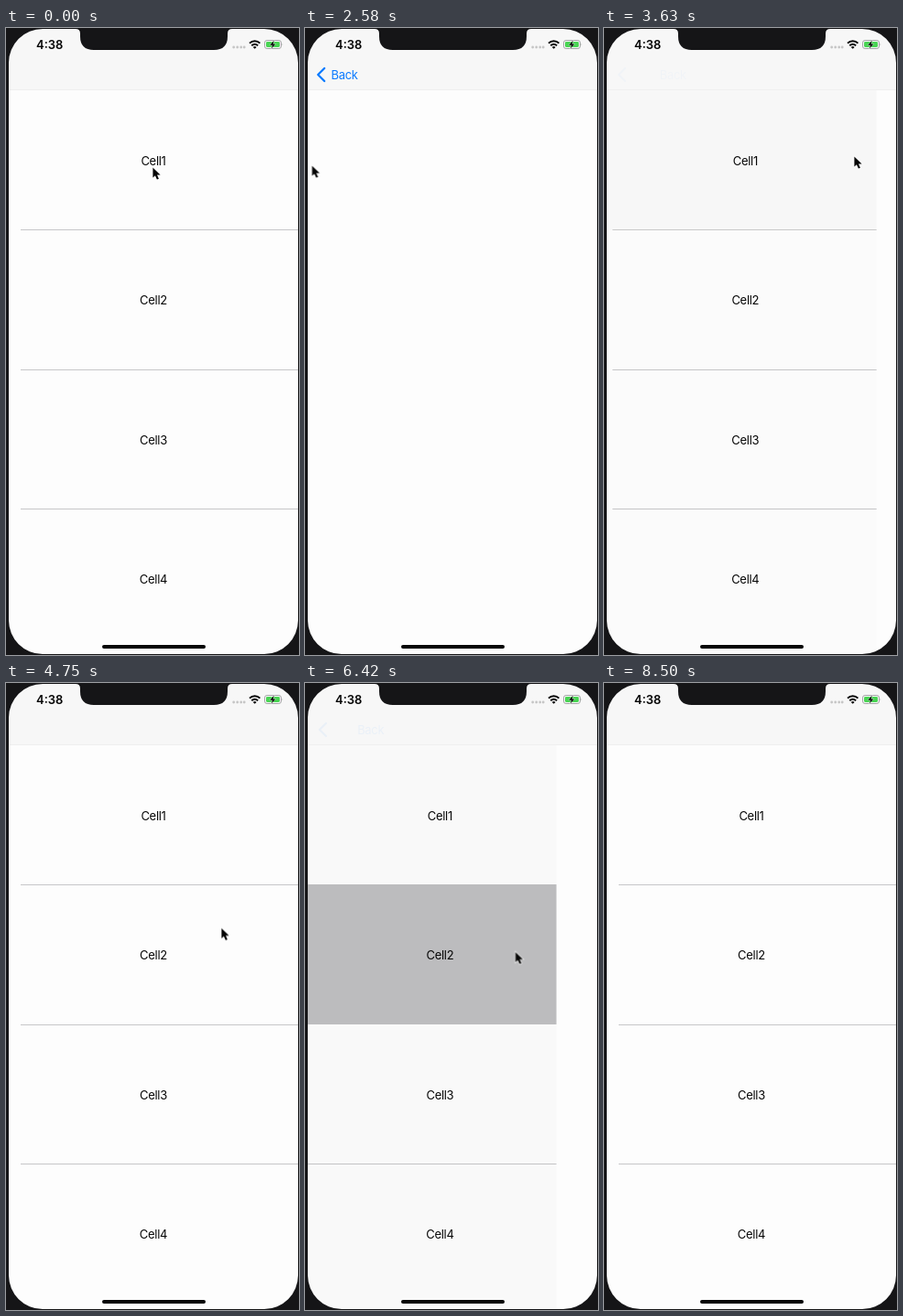
Recreate the animation shown at these times as an HTML page. Size 320 by 685 pixels, loop 8540 ms.

```html
<!DOCTYPE html>
<html lang="en">
<head>
<meta charset="utf-8">
<title>List navigation</title>
<style>
/* --p: 0 = detail pushed, 1 = list at rest; --s1, --s2: row selection */
@property --p { syntax: '<number>'; inherits: true; initial-value: 1; }
@property --s1 { syntax: '<number>'; inherits: true; initial-value: 0; }
@property --s2 { syntax: '<number>'; inherits: true; initial-value: 0; }

:root { --loop: 8540ms; --paper: #fdfdfd; --case: #151517; }
html, body { margin: 0; width: 100%; height: 100%; overflow: hidden; background: var(--case); }
.stage {
  position: relative; width: 320px; height: 685px; overflow: hidden;
  font: 13px/20px Inter, "Liberation Sans", sans-serif; letter-spacing: -.3px; color: #060606;
  animation: nav var(--loop) infinite linear, pick1 var(--loop) infinite linear, pick2 var(--loop) infinite linear;
}
.stage > *, .list > * { position: absolute; }

.list {
  left: 3px; top: 68px; width: 317px; height: 617px; background: var(--paper);
  transform: translateX(calc((var(--p) - 1) * 95px));
}
.line { left: 13px; right: 0; height: 1px; background: #c6c6c8; opacity: calc(1 - var(--hide, 0)); }
.pick { left: 0; right: 0; height: 152.5px; background: #bfbfc1; opacity: var(--s); }
.label { left: 0; width: 316px; text-align: center; }
.dim { inset: 0; background: #000; opacity: calc(.1 * (1 - var(--p))); }

.detail {
  left: 3px; top: 68px; width: 317px; height: 617px; background: var(--paper);
  transform: translateX(calc(var(--p) * 317px));
}
.bar { left: 0; top: 0; width: 320px; height: 68px; background: #f7f7f7; border-bottom: 1px solid #efefef; box-sizing: border-box; }
.chevron, .back {
  --q: calc(1 - var(--p));
  opacity: max(calc(1.2 * var(--q) * var(--q) * var(--q) * var(--q)), calc(.35 * var(--q)));
}
.chevron { left: 12px; top: 42px; transform: translateX(calc(var(--p) * 2px)); }
.back {
  left: 28.5px; top: 41px; color: #0a7aff;
  transform: translateX(calc((.5 * var(--p) + .5 * var(--p) * var(--p)) * 36px));
}
.clock { left: 33px; top: 8px; font-weight: 600; letter-spacing: 0; }
.frame { left: 0; top: 0; }
.cursor { left: 0; top: 0; overflow: visible; animation: move var(--loop) infinite ease-in-out; }

@keyframes nav {
  0% { --p: 1; }
  15.632% { --p: 1; animation-timing-function: cubic-bezier(.16, .8, .3, 1); }
  21.487%, 33.372% { --p: 0; }
  36.651% { --p: .366; }
  40.749% { --p: .72; }
  41.686% { --p: .78; animation-timing-function: cubic-bezier(.16, .8, .3, 1); }
  45.667% { --p: 1; }
  75.012% { --p: 1; animation-timing-function: cubic-bezier(.16, .8, .3, 1); }
  80.867% { --p: 0; }
  86.124% { --p: 0; animation-timing-function: cubic-bezier(.16, .8, .3, 1); }
  91.979%, 100% { --p: 1; }
}
@keyframes pick1 {
  0%, 14.51% { --s1: 0; }
  14.52%, 33.372% { --s1: 1; }
  36.651% { --s1: .634; }
  40.749% { --s1: .28; }
  41.686% { --s1: .22; animation-timing-function: cubic-bezier(.16, .8, .3, 1); }
  45.667%, 100% { --s1: 0; }
}
@keyframes pick2 {
  0%, 74.12% { --s2: 0; }
  74.13% { --s2: 1; }
  86.124% { --s2: 1; animation-timing-function: cubic-bezier(.16, .8, .3, 1); }
  91.979%, 100% { --s2: 0; }
}
@keyframes move {
  0%, 22.5% { transform: translate(160px, 152px); }
  30.5% { transform: translate(7px, 150px); }
  32.6% { transform: translate(7px, 148px); animation-timing-function: linear; }
  33.372% { transform: translate(26px, 146px); animation-timing-function: linear; }
  36.651% { transform: translate(142px, 135.5px); animation-timing-function: linear; }
  40.749% { transform: translate(254px, 138px); animation-timing-function: linear; }
  41.686%, 45% { transform: translate(273px, 140px); }
  53.5%, 64% { transform: translate(235px, 267.5px); }
  71%, 78.5% { transform: translate(229.5px, 293.5px); }
  84.5%, 93% { transform: translate(54px, 46px); }
  97.5%, 100% { transform: translate(60px, -24px); }
}
</style>
</head>
<body>
<div class="stage">
  <div class="list">
    <div class="line" style="--hide:calc(var(--s1) + var(--s2));top:152px"></div>
    <div class="line" style="--hide:var(--s2);top:304.5px"></div>
    <div class="line" style="top:456.5px"></div>
    <div class="pick" style="--s:var(--s1);top:0"></div>
    <div class="pick" style="--s:var(--s2);top:152px"></div>
    <div class="label" style="top:66.5px">Cell1</div>
    <div class="label" style="top:219px">Cell2</div>
    <div class="label" style="top:371.5px">Cell3</div>
    <div class="label" style="top:524px">Cell4</div>
    <div class="dim"></div>
  </div>
  <div class="detail"></div>
  <div class="bar"></div>
  <svg class="chevron" width="12" height="18" fill="none" stroke="#0a7aff" stroke-width="2.3" stroke-linecap="round" stroke-linejoin="round">
    <path d="M9.2 2L2.2 9l7 7"/>
  </svg>
  <div class="back">Back</div>
  <div class="clock">4:38</div>

  <svg class="frame" width="320" height="685">
    <path fill="#151517" fill-rule="evenodd" d="M0 0H320V685H0Z
      M40 1H76Q81 1 81 6V9Q81 24 96 24H227Q242 24 242 9V6Q242 1 247 1H282
      A37 37 0 0 1 319 38V647A37 37 0 0 1 282 684H40A37 37 0 0 1 3 647V38A37 37 0 0 1 40 1Z"/>
    <rect x="105" y="674" width="113" height="4" rx="2" fill="#060606"/>
    <g fill="#c6c6c6">
      <circle cx="248.7" cy="21" r="1.4"/><circle cx="252.7" cy="21" r="1.4"/>
      <circle cx="256.7" cy="21" r="1.4"/><circle cx="260.2" cy="21" r="1.4"/>
    </g>
    <g fill="none" stroke="#060606" stroke-width="2">
      <path d="M266 16.6a8 8 0 0 1 11.4 0"/>
      <path d="M268.3 19.2a4.8 4.8 0 0 1 6.8 0"/>
    </g>
    <path fill="#060606" d="M269.8 20.9a2.7 2.7 0 0 1 3.8 0l-1.9 1.9Z"/>
    <rect x="282.5" y="13.5" width="18" height="9" rx="2.6" fill="none" stroke="#a4a4a6"/>
    <rect x="284" y="15" width="15" height="6" rx="1.4" fill="#48d453"/>
    <path d="M301.6 16.5q1.3 1.5 0 3Z" fill="#a4a4a6"/>
    <path d="M292.8 13.6l-4.6 5.1h2.8l-1.2 3.8 4.6-5.1h-2.8Z" fill="#060606" stroke="#fdfdfd" stroke-width=".7" paint-order="stroke"/>
  </svg>

  <svg class="cursor" width="12" height="16">
    <path d="M.4.4V11.6L2.9 9.3 4.9 13.6 6.9 12.7 5 8.5H8.6Z" fill="#060606" stroke="#fff" stroke-width="1.2" paint-order="stroke"/>
  </svg>
</div>
</body>
</html>
```
